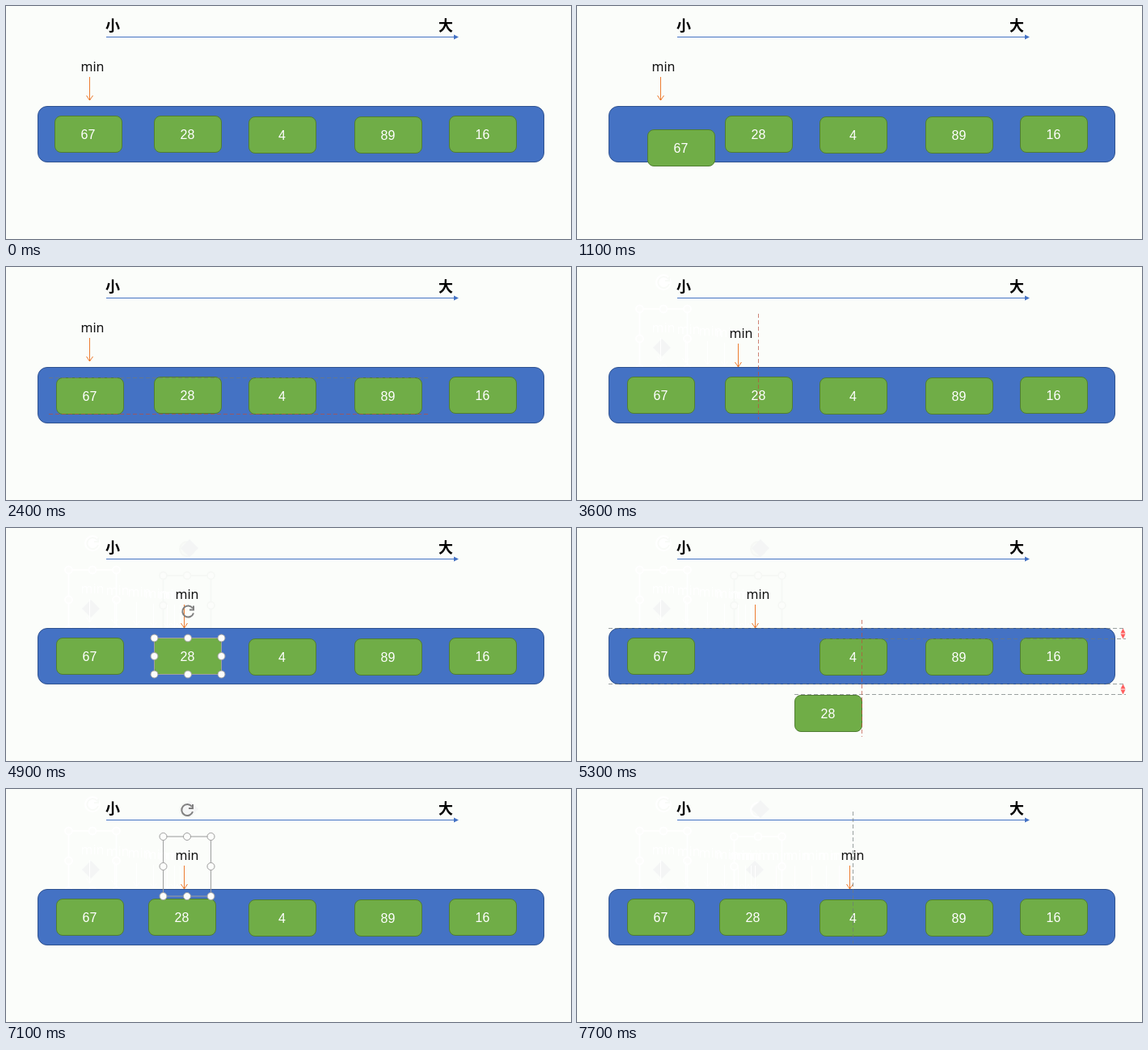
These frames come from a looping animation (699 px wide and 289 px high, 8000 ms). An HTML page:

```html
<!DOCTYPE html>
<html lang="zh">
<head>
<meta charset="utf-8">
<title>Selection sort</title>
<style>
  html, body { margin: 0; width: 100%; height: 100%; overflow: hidden; background: #fbfdfa; }
  svg { display: block; width: 699px; height: 289px; }
  text { text-anchor: middle; }
  .num { font: 16px "Liberation Sans", Arial, sans-serif; fill: #fff; }
  .min { font: 16px "Noto Sans", "Open Sans", sans-serif; }
  .end { font: 700 18px "Noto Sans CJK SC", "Noto Sans CJK", sans-serif; fill: #000; }
</style>
</head>
<body>
<svg id="stage" viewBox="0 0 699 289"></svg>
<script>
const LOOP = 8000, STEP = 100;
const RED = '#bd4f3e', GRAY = '#6f7a7a', PINK = '#ff5f5f', ORANGE = '#ed7d31';
const stage = document.getElementById('stage');

const ease = k => k * (1.4 - .4 * k);

// Eases through [x, y] stops; each leg is { from, to, end }
function mover(start, legs) {
  return t => {
    let [x, y] = start;
    for (const { from, to, end } of legs) {
      if (t < from) break;
      const k = ease(Math.min(1, (t - from) / (to - from)));
      x += (end[0] - x) * k;
      y += (end[1] - y) * k;
    }
    return [Math.round(x), Math.round(y)];
  };
}

const pos67 = mover([60, 136], [
  { from: 1000, to: 1600, end: [182, 214] },
  { from: 1800, to: 2400, end: [62, 137] },
  { from: 2400, to: 2500, end: [62, 136] }
]);
const pos28 = mover([183, 136], [
  { from: 4900, to: 5300, end: [269, 207] },
  { from: 5300, to: 5500, end: [300, 207] },
  { from: 5800, to: 6100, end: [181, 146] },
  { from: 6100, to: 6300, end: [176, 136] }
]);
const posMin = mover([107, 75], [
  { from: 3200, to: 3600, end: [203, 82] },
  { from: 3600, to: 3900, end: [224, 82] },
  { from: 7100, to: 7700, end: [341, 82] }
]);

function line(x1, y1, x2, y2, color, extra = '') {
  return `<path d="M${x1} ${y1}L${x2} ${y2}" fill="none" stroke="${color}" ${extra}/>`;
}
const guide = (x1, y1, x2, y2, color) =>
  line(x1, y1, x2, y2, color, 'stroke-dasharray="5 3" stroke-opacity=".7"');
const vGuide = (x, y1, y2, color = RED) => guide(x + .5, y1, x + .5, y2, color);
const hGuide = (y, x1, x2, color = GRAY) => guide(x1, y + .5, x2, y + .5, color);

function block([x, y], n) {
  return `<rect x="${x + .5}" y="${y + .5}" width="83" height="45" rx="7.5" fill="#70ad47" stroke="#507e32"/>
    <text class="num" x="${x + 41.5}" y="${y + 29}">${n}</text>`;
}

function pointer([x, y], textColor, color) {
  const ax = x - 3.5, tip = y + 42;
  return `<text class="min" x="${x}" y="${y + 6}" fill="${textColor}">min</text>` +
    line(ax, y + 13, ax, tip, color) +
    `<path d="M${ax - 4} ${tip - 6}L${ax} ${tip}L${ax + 4} ${tip - 6}" fill="none" stroke="${color}"/>`;
}

// Selection frame with eight handles and a rotate knob
function frame(x, y, w, h, edge, knob, weight = 1) {
  const cx = x + w / 2, ky = y - 33;
  const paint = `stroke="${edge}" stroke-width="${weight}"`;
  let s = `<rect x="${x}" y="${y}" width="${w}" height="${h}" fill="none" ${paint}/>`;
  for (const i of [0, .5, 1]) for (const j of [0, .5, 1]) {
    if (i === .5 && j === .5) continue;
    s += `<circle cx="${x + w * i}" cy="${y + h * j}" r="4.5" fill="#fcfdfb" ${paint}/>`;
  }
  return s + `<path d="M${cx + 6} ${ky - 4}A7 7 0 1 0 ${cx + 7} ${ky + 2}M${cx + 7} ${ky - 7}v5h-5"
    fill="none" stroke="${knob}" stroke-width="2"/>`;
}
const blockFrame = ([x, y]) => frame(x + .5, y + .5, 83, 45, '#a0a0a0', '#808080');
const minFrame = ([x, y], edge = '#a0a0a0', knob = '#808080', weight = 1) =>
  frame(x - 29.5, y - 23, 59, 74, edge, knob, weight);

function ghostFrame([x, y], edge) {
  return `<circle cx="${x}" cy="${y - 56}" r="10" fill="${edge}"/>` +
    minFrame([x, y], edge, '#f9fbf8', 1.8);
}
const ghostCursor = (x, y) =>
  `<path d="M${x} ${y - 11}l11 11l-11 11l-11 -11z" fill="#f4f5f5"/>`;

// Pale remains left behind by the dragged label
function trail(t) {
  let s = '';
  if (t >= 3300) s += ghostFrame(posMin(0), '#fff') + ghostCursor(105, 100);
  if (t >= 4900) s += ghostFrame(posMin(4900), t < 7200 ? '#f6f8f5' : '#fff') + ghostCursor(227, 25);
  if (t >= 7200) s += ghostCursor(220, 100);
  for (let u = 3200; u < t; u += STEP) {
    if (posMin(u)[0] < posMin(u + STEP)[0]) s += pointer(posMin(u), '#fff', '#fff');
  }
  return s;
}

function arrowHead(x, y, dx, dy) {
  return `<path d="M${x} ${y}l${-6 * dx - 3 * dy} ${-6 * dy - 3 * dx}l${6 * dy} ${6 * dx}z" fill="${PINK}"/>`;
}
function gapX(x1, x2, y) {
  return vGuide(x1, 137, 204, GRAY) + vGuide(x2, 137, 204, GRAY) +
    line(x1 + 6, y, x2 - 5, y, PINK, 'stroke-dasharray="4 3"') +
    arrowHead(x1 + .5, y, -1, 0) + arrowHead(x2 + .5, y, 1, 0);
}
function gapY(y1, y2, x1, x2) {
  return hGuide(y1, x1, 679) + hGuide(y2, x2, 679) +
    arrowHead(675.5, y1 + .5, 0, -1) + arrowHead(675.5, y2 + .5, 0, 1);
}

// Alignment help and selection frames, each with its time span
const overlays = [
  [1000, 1100, t => blockFrame(pos67(t))],
  [1600, 1900, () => vGuide(183, 126, 270, GRAY) + vGuide(266, 126, 270)],
  [2400, 2500, () => hGuide(137, 53, 525) + hGuide(182, 53, 525, RED)],
  [2500, 2700, () => hGuide(136, 53, 641) + hGuide(181, 53, 641, RED) + vGuide(103, 78, 192)],
  [2700, 3200, t => blockFrame(pos67(t))],
  [3200, 3300, t => minFrame(posMin(t))],
  [3600, 4300, () => vGuide(224, 58, 189)],
  [4300, 4900, t => minFrame(posMin(t))],
  [4900, 5000, t => blockFrame(pos28(t))],
  [5300, 5900, t => gapY(124, 137, 39, 300) + gapY(193, 206, 39, pos28(t)[0])],
  [5300, 5400, () => vGuide(352, 114, 259)],
  [5500, 5900, () => vGuide(341, 28, 259, GRAY)],
  [6100, 6200, () => gapX(145, 181, 201.5) + gapX(264, 300, 201.5)],
  [6600, 7100, t => blockFrame(pos28(t))],
  [7100, 7200, t => minFrame(posMin(t))],
  [7600, 8000, () => vGuide(341, 28, 192, GRAY)]
];

function draw(t) {
  stage.innerHTML =
    '<rect width="699" height="289" fill="#fbfdfa"/>' + trail(t) +
    '<text class="end" x="132" y="31">小</text><text class="end" x="544" y="31">大</text>' +
    line(124, 38.5, 555, 38.5, '#4472c4') +
    '<path d="M554 35.5L560 38.5L554 41.5z" fill="#4472c4"/>' +
    '<rect x="39.5" y="124.5" width="626" height="69" rx="11.5" fill="#4472c4" stroke="#2f528f"/>' +
    block([300, 137], 4) + block([431, 137], 89) + block([548, 136], 16) +
    block(pos28(t), 28) + block(pos67(t), 67) +
    pointer(posMin(t), '#111', ORANGE) +
    overlays.filter(([a, b]) => t >= a && t < b).map(o => o[2](t)).join('');
}

let last = -1;
function tick(now) {
  const step = Math.floor((now % LOOP) / STEP);
  if (step !== last) draw((last = step) * STEP);
  requestAnimationFrame(tick);
}
draw(0);
requestAnimationFrame(tick);
</script>
</body>
</html>
```
